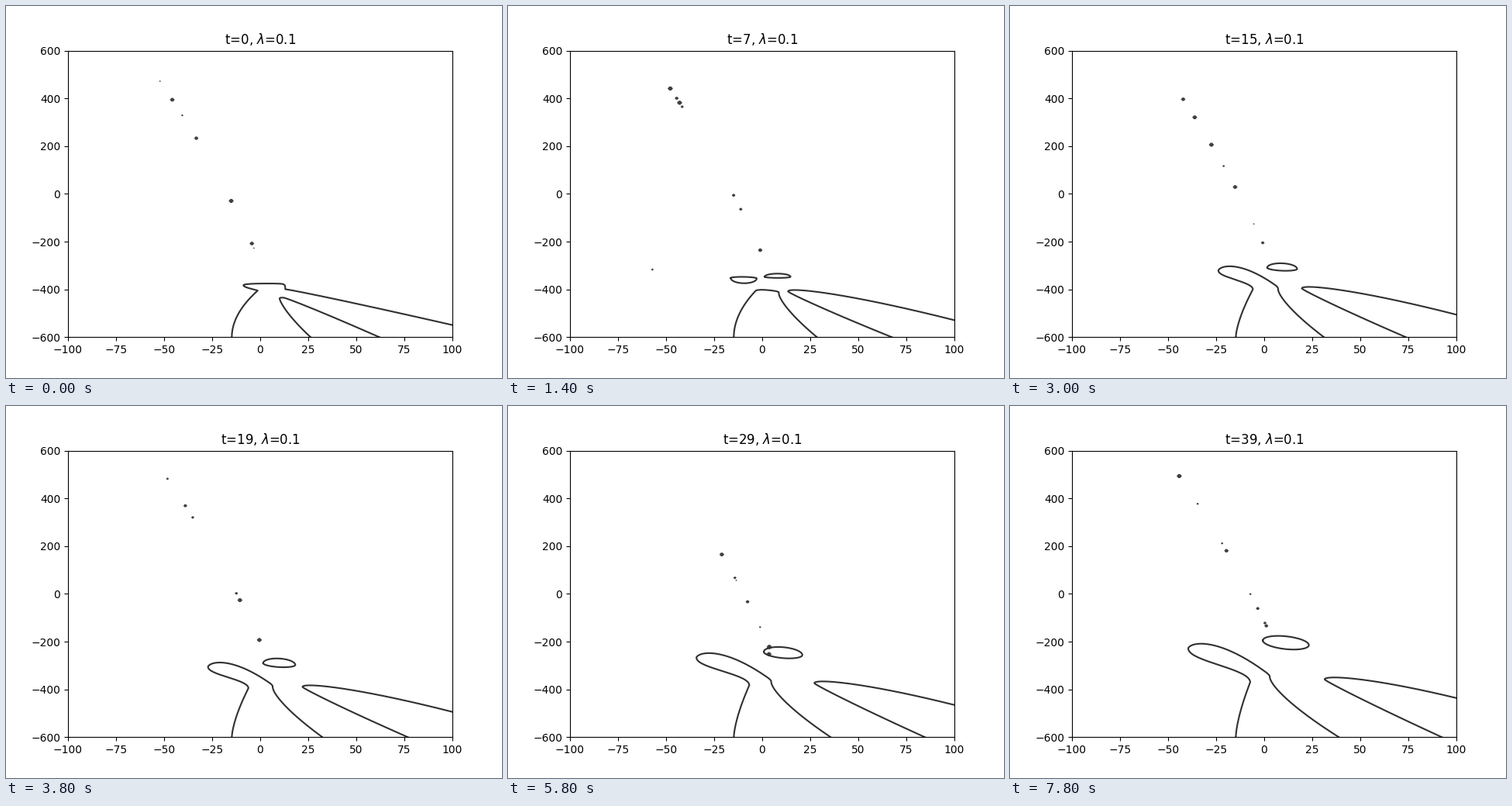
Write a matplotlib script that moves like this. It is 640 by 480 pixels and loops after 8000 ms.

```python
import numpy as np
import matplotlib.pyplot as plt
from matplotlib.animation import FuncAnimation

FRAMES, STEP = 40, 200
MERGE = 15  # time at which the left oval joins the body
INK, DOT_INK = "#303030", "#404040"
LEFT_FOOT = np.array([-14.8, -601])


def pt(x, y):
    return np.array([x, y], float)


def arc(a, b, bulge, power=0.5):
    """Chord from a to b that swells most near a."""
    u = np.linspace(0, 1, 20)[:, None] ** 2
    lift = bulge * u**power * (1 - u)
    return a + (b - a) * u + lift * [0, 1]


def leg(a, b, power):
    """Curve from a to b that sets off upright and leans over."""
    w = np.linspace(0, 1, 14)[:, None]
    return a + (b - a) * np.hstack([w**power, w])


def s_bend(a, b):
    """Bezier from a to b, upright at both ends."""
    s = np.linspace(0, 1, 16)[:, None]
    x = 3 * s**2 - 2 * s**3
    y = 3 * 0.38 * s * (1 - s) ** 2 + 3 * 0.6 * s**2 * (1 - s) + s**3
    return a + (b - a) * np.hstack([x, y])


def oval(a, b, up, down):
    """Closed outline with ends a and b and its own height on each side."""
    th = np.linspace(0, 2 * np.pi, 60)[:, None]
    height = np.where(th < np.pi, up, down)
    return a + (b - a) * (1 - np.cos(th)) / 2 + height * np.sin(th) * [0, 1]


def soften(p, passes=2):
    """Cut the corners of an open line."""
    for _ in range(passes):
        a, b = p[:-1], p[1:]
        cuts = np.stack([0.75 * a + 0.25 * b, 0.25 * a + 0.75 * b], axis=1)
        p = np.vstack([p[:1], cuts.reshape(-1, 2), p[-1:]])
    return p


def outlines(t):
    notch = pt(9.9 - 0.18 * t, -435 + 2.1 * t)
    shoulder = notch + [0, 13]
    right_foot = pt(26.3 + 0.325 * t, -601)
    right_leg = leg(notch, right_foot, 1.35)
    crown = pt(-1.3 - 0.19 * t, -405 + 0.8 * t)
    left_tip = pt(-8.9 - 1.13 * t + 0.0088 * t**2, -379.5 + 3.85 * t)
    wedge_foot = pt(62.2 + 0.78 * t, -601)
    wedge_edge = pt(100, -549.5 + 2.9 * t)

    if t == 0:
        # one ridge runs across the top, with a loop below it
        corner = pt(13, -400)
        ridge = [crown, left_tip - [0, 9], left_tip + [0.5, 3],
                 pt(11, -375), pt(13, -382)]
        top = np.vstack([leg(LEFT_FOOT, crown, 2), ridge,
                         arc(corner, wedge_edge, 10)])
        loop = np.vstack([arc(pt(12, -435), wedge_foot, 12)[::-1], right_leg])
        return [soften(top), soften(loop)]

    wedge_tip = pt(max(5 * np.sqrt(t), 12.5) + 0.2, -419.5 + 1.57 * t)
    wedge = np.vstack([arc(wedge_tip, wedge_foot, -16)[::-1],
                       arc(wedge_tip, wedge_edge, 55)])
    right_oval = oval(pt(0.6 + 0.13 * t - 0.0042 * t**2, -380.5 + 4.75 * t),
                      pt(12.5 + 0.33 * t - 0.0014 * t**2, -376.5 + 4.15 * t),
                      28 * (1 - np.exp(-t / 11)), 0.68 * t)
    if t < MERGE:
        body = np.vstack([leg(LEFT_FOOT, crown, 2), [shoulder], right_leg])
        right_end = pt(1.7 - 0.65 * t, -380.5 + 3.75 * t)
        left_oval = oval(left_tip, right_end, 0.8 * t, 3 * t)
        return [wedge, right_oval, soften(body), left_oval]

    waist = pt(-5 - 0.057 * t, -418.5 + 1.25 * t)
    body = np.vstack([leg(LEFT_FOOT, waist, 1.5),
                      s_bend(left_tip, waist)[::-1],
                      arc(left_tip, shoulder, 92 + 1.5 * t, 0.65),
                      right_leg])
    return [wedge, right_oval, soften(body)]


def specks(t):
    """Noise along a bent line that drifts right, with a rare stray."""
    rng = np.random.default_rng(t)
    n = rng.integers(2, 9)
    y = rng.uniform(-240, 540, n)
    x = -17 - 0.065 * y - 2e-5 * y**2 + 0.25 * t
    if rng.random() < 0.5:
        x[0], y[0] = rng.uniform(-95, 30), rng.uniform(-370, -180)
    return np.column_stack([x, y]), rng.uniform(2, 7, n)


fig, ax = plt.subplots(figsize=(6.4, 4.8), dpi=100)
ax.set_xlim(-100, 100)
ax.set_ylim(-600, 600)
title = ax.set_title("")
lines = [ax.plot([], [], color=INK, lw=1.5)[0] for _ in range(4)]
diamond = [(-1, 0), (-0.35, 0.75), (0.35, 0.75), (1, 0),
           (0.35, -0.75), (-0.35, -0.75), (-1, 0)]
dots = ax.scatter([], [], marker=diamond, color=DOT_INK, linewidths=0)


def draw(t):
    title.set_text(rf"t={t}, $\lambda$=0.1")
    for line in lines:
        line.set_data([], [])
    for line, path in zip(lines, outlines(t)):
        line.set_data(*path.T)
    spots, width = specks(t)
    dots.set_offsets(spots)
    dots.set_sizes((width * 0.72) ** 2)
    return [title, dots, *lines]


anim = FuncAnimation(fig, draw, frames=FRAMES, interval=STEP,
                     init_func=lambda: draw(0), repeat=True, repeat_delay=0)
plt.show()
```
